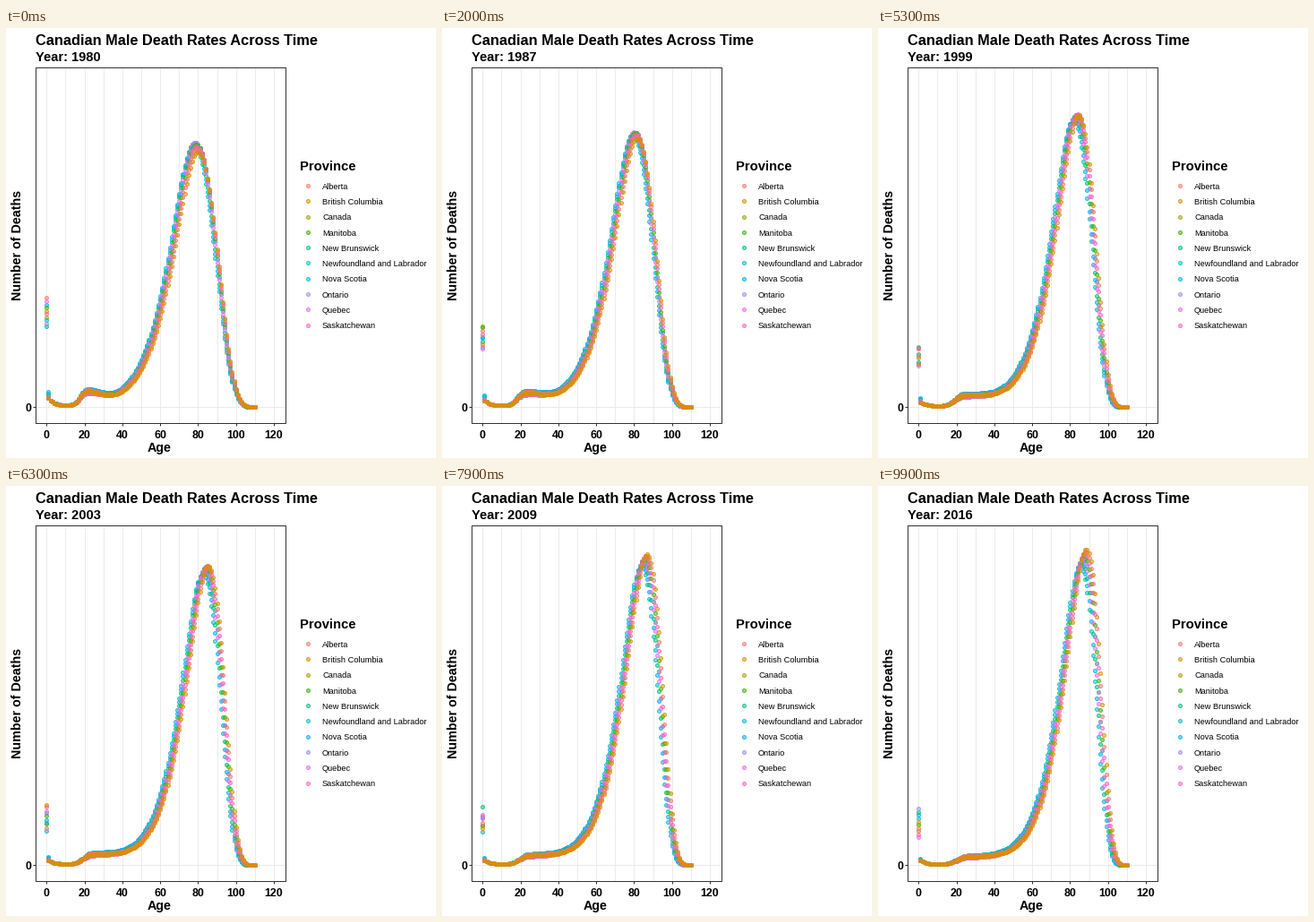
These frames come from a looping animation (480 by 480 pixels, 10 s). A matplotlib script:

```python
import numpy as np
import matplotlib.pyplot as plt
from matplotlib.animation import FuncAnimation
from matplotlib.colors import to_rgba
from matplotlib.patches import Rectangle

SIZE, DPI = 480, 72
FRAMES, INTERVAL = 100, 100
FIRST, LAST = 1980, 2016
LEFT, RIGHT, TOP, BOTTOM = 33, 312, 44, 441
ZERO_X, ZERO_Y = 45.3, 423.4
PER_YEAR = (RIGHT - LEFT) / 132
INK, GRID = "#333333", "#EBEBEB"

plt.rcParams["font.family"] = "Liberation Sans"
rng = np.random.default_rng(4)

AGES = np.arange(111)
YEARS = np.arange(FIRST, LAST + 1)

EAST_TO_WEST = ["Newfoundland and Labrador", "Nova Scotia", "New Brunswick",
                "Quebec", "Ontario", "Manitoba", "Saskatchewan", "Alberta",
                "British Columbia"]
REGIONS = ["Canada"] + EAST_TO_WEST
LEGEND = sorted(REGIONS)

# -1 is the east coast, 1 the west coast, the whole country sits between
WEST = dict(zip(REGIONS, [0, *np.linspace(-1, 1, len(EAST_TO_WEST))]))
BUMP = dict(zip(REGIONS, rng.uniform(0.8, 1.2, len(REGIONS))))
SPREAD = np.linspace(-16, 16, len(REGIONS))
INFANT = dict(zip(REGIONS, np.array([rng.permutation(SPREAD)
                                     for _ in YEARS]).T))


def hue_color(i, n):
    """Evenly spaced hues at luminance 65 and chroma 100 in CIE LUV."""
    lum, chroma, hue = 65, 100, np.radians(15 + 360 * i / n)
    u = chroma * np.cos(hue) / (13 * lum) + 0.1978
    v = chroma * np.sin(hue) / (13 * lum) + 0.4683
    y = ((lum + 16) / 116) ** 3
    x, z = y * 9 * u / (4 * v), y * (12 - 3 * u - 20 * v) / (4 * v)
    rgb = np.array([3.2406 * x - 1.5372 * y - 0.4986 * z,
                    -0.9689 * x + 1.8758 * y + 0.0415 * z,
                    0.0557 * x - 0.2040 * y + 1.0570 * z]).clip(0, 1)
    return np.where(rgb > 0.0031, 1.055 * rgb ** (1 / 2.4) - 0.055,
                    12.92 * rgb).clip(0, 1)


COLORS = {name: hue_color(i, len(LEGEND)) for i, name in enumerate(LEGEND)}


def trend(year, start, end):
    return start + (end - start) * (year - FIRST) / (LAST - FIRST)


def deaths(name, year):
    """Height of the death curve above zero, in pixels, for every age."""
    west = WEST[name]
    shift = west * trend(year, 1.2, 1.7)
    mode = trend(year, 78.6, 87) + shift
    height = (min(trend(year, 288, 354), 344) + west * trend(year, -4, 9)
              + trend(year, 7, 0) * np.cos(np.pi * west / 2))

    # Gompertz peak, with its own steepness on each side
    rise = trend(year, 0.096, 0.107)
    fall = trend(year, 0.080, 0.114) + 0.002 * shift
    u = np.exp(np.where(AGES < mode, rise, fall) * (AGES - mode))
    curve = height * u * np.exp(1 - u)

    # Young adult bump, which flattens into a plateau
    center = trend(year, 21, 25)
    width = np.where(AGES < center, trend(year, 3, 4.5), trend(year, 8, 20))
    bump = BUMP[name] * trend(year, 13.5, 7.5)
    curve += bump * np.exp(-0.5 * ((AGES - center) / width) ** 2)

    # Childhood
    infant = 44 + 62 * np.exp(-(year - FIRST) / 12)
    curve += 0.08 * infant * np.exp(-(AGES - 1) / 3) + 1.2 * np.exp(-AGES / 30)
    curve[1] += trend(year, 7, 2) * max(-west, 0)
    curve[0] = infant + np.interp(year, YEARS, INFANT[name])
    return curve


fig = plt.figure(figsize=(SIZE / DPI, SIZE / DPI), dpi=DPI, facecolor="white")
ax = fig.add_axes([0, 0, 1, 1])
ax.set_xlim(0, SIZE)
ax.set_ylim(SIZE, 0)
ax.axis("off")


def age_x(age):
    return ZERO_X + age * PER_YEAR


def label(x, y, text, size, weight="bold", va="baseline", **kw):
    return ax.text(x, y, text, fontsize=size, fontweight=weight,
                   color="black", va=va, **kw)


def line(x0, y0, x1, y1, color):
    ax.plot([x0, x1], [y0, y1], color=color, lw=1, zorder=1,
            solid_capstyle="butt")


def dots(x, y, color):
    return ax.plot(x, y, "o", ms=4, mew=1, zorder=2, mfc=to_rgba(color, 0.5),
                   mec=to_rgba(color, 0.8))[0]


# Panel
for age in range(0, 121, 10):
    line(age_x(age), TOP, age_x(age), BOTTOM, GRID)
line(LEFT, ZERO_Y, RIGHT, ZERO_Y, GRID)
ax.add_patch(Rectangle((LEFT, TOP), RIGHT - LEFT, BOTTOM - TOP, fill=False,
                       ec=INK, lw=1, zorder=3))

# Axes
for age in range(0, 121, 20):
    line(age_x(age), BOTTOM, age_x(age), BOTTOM + 3, INK)
    label(age_x(age), 457.5, str(age), 12.4, ha="center")
line(LEFT - 3, ZERO_Y, LEFT, ZERO_Y, INK)
label(28, 428.3, "0", 12.4, ha="right")
label(171.5, 473, "Age", 14.3, ha="center")
label(20.5, 242, "Number of Deaths", 14.3, va="center", ha="right",
      rotation=90)

# Titles
label(33, 19, "Canadian Male Death Rates Across Time", 16.4)
subtitle = label(33, 37, "", 14.6)

# Legend
label(328, 159, "Province", 14.8)
for i, name in enumerate(LEGEND):
    y = 176 + 17.28 * i
    dots([337], [y], COLORS[name])
    label(353, y + 3.7, name, 9.2, "normal")

series = {name: dots(age_x(AGES), np.full(AGES.size, ZERO_Y), COLORS[name])
          for name in REGIONS}


def update(frame):
    year = trend_year = FIRST + (LAST - FIRST) * frame / (FRAMES - 1)
    subtitle.set_text(f"Year: {round(trend_year)}")
    for name, points in series.items():
        points.set_ydata(ZERO_Y - deaths(name, year))
    return [subtitle, *series.values()]


anim = FuncAnimation(fig, update, frames=FRAMES, interval=INTERVAL,
                     repeat=True, repeat_delay=0)
plt.show()
```
